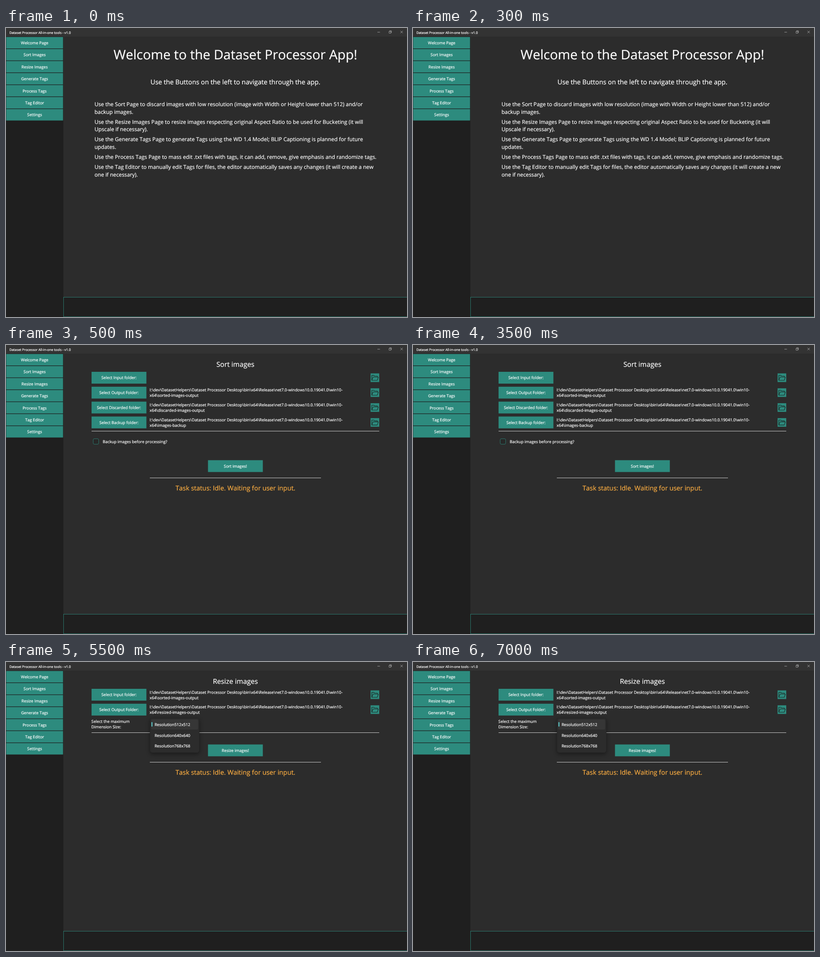
Recreate the animation shown at these times as an HTML page. Size 881 by 636 pixels, loop 8000 ms.

```html
<!DOCTYPE html>
<html lang="en">
<head>
<meta charset="utf-8">
<title>Dataset Processor</title>
<style>
  html, body { margin: 0; width: 100%; height: 100%; overflow: hidden; background: #2c2c2c; }
  svg { display: block; width: 881px; height: 636px; }
  text {
    font-family: "Open Sans", "Noto Sans", sans-serif;
    font-size: 8.82px;
    font-kerning: none;
    fill: #fff;
    stroke: #fff;
    stroke-width: .22px;
    white-space: pre;
    text-rendering: geometricPrecision;
  }
  .mid { text-anchor: middle; }
  .caption { font-size: 7.32px; }
  .title { font-size: 29.07px; }
  .lead { font-size: 14.33px; }
  .body { font-size: 11.78px; }
  .heading { font-size: 15.2px; }
  .status { font-size: 14.33px; fill: #f9ac42; stroke: #f9ac42; }
  .teal { fill: #2d8b7e; }
  .rule { fill: #c8c8c8; shape-rendering: crispEdges; }
  .thin { fill: none; stroke: #c8c8c8; stroke-width: .7; }
  .outline { stroke: #2d8b7e; stroke-width: .8; }
  .folder { fill: none; stroke: #1d2b29; stroke-width: 1.1; stroke-linejoin: round; }
  .popup { fill: #2c2c2c; stroke: #262626; stroke-width: .7; filter: drop-shadow(0 3px 4px rgba(0, 0, 0, .4)); }
</style>
</head>
<body>
<svg id="stage" viewBox="0 0 881 636"></svg>
<script>
const LOOP = 8000;
const CENTER = 504;

const rect = (x, y, w, h, cls, extra = '') =>
  `<rect x="${x}" y="${y}" width="${w}" height="${h}" class="${cls}" ${extra}/>`;
const text = (x, y, str, cls = '') => `<text x="${x}" y="${y}" class="${cls}">${str}</text>`;
const lines = (x, y, step, rows, cls) => rows.map((row, i) => text(x, y + i * step, row, cls)).join('');

// Filled button with its label centred on (cx, cy).
const button = (cx, cy, w, h, label) =>
  rect(cx - w / 2, cy - h / 2, w, h, 'teal') + text(cx, cy + 3.4, label, 'mid');

const folderIcon = cy => `<g transform="translate(801 ${cy - 9.5})">
  ${rect(0, 0, 19, 19, 'teal')}
  <path class="folder" d="M2.6 15.2V4.4H7.2L8.8 6H15V8.2M2.6 15.2L5.4 8.2H17L14.6 15.2Z"/></g>`;

const ROOT = 'I:\\dev\\DatasetHelpers\\Dataset Processor Desktop\\bin\\x64\\Release\\net7.0-windows10.0.19041.0\\win10-';

function folderRow(index, label, folder) {
  const cy = 72 + index * 32.8;
  const path = folder ? lines(315.6, cy - 2.5, 12, [ROOT, 'x64\\' + folder]) : '';
  return button(248.2, cy, 120.5, 26, label) + path + folderIcon(cy);
}

// Action button, short rule and status line.
const task = (cy, label) =>
  button(CENTER, cy, 120.5, 26, label) +
  rect(316, cy + 25.5, 376, 1, 'rule') +
  text(CENTER, cy + 53.2, 'Task status: Idle. Waiting for user input.', 'mid status');

function frame() {
  const menu = ['Welcome Page', 'Sort Images', 'Resize Images', 'Generate Tags',
    'Process Tags', 'Tag Editor', 'Settings'];
  return rect(0, 0, 881, 636, '', 'fill="#2c2c2c"') +
    rect(0, 19, 126, 617, '', 'fill="#1f1f1f"') +
    rect(0, 0, 881, 19, '', 'fill="#333"') +
    text(7.4, 12.7, 'Dataset Processor All-in-one tools - v1.0', 'caption') +
    `<path class="thin" d="M816 9.2h5.6M866.6 6.2l5.2 5.2M871.8 6.2l-5.2 5.2"/>
     <path class="thin" d="M841.6 7.4h4v4h-4zM842.8 7.2v-1.1h4v4h-1"/>` +
    menu.map((label, i) => button(62.9, 32.4 + i * 26.43, 124.8, 25.2, label)).join('') +
    rect(126.4, 592.6, 760, 42.9, 'outline', 'fill="#1f1f1f"');
}

function welcomePage() {
  const paragraphs = [
    ['Use the Sort Page to discard images with low resolution (image with Width or Height lower than 512) and/or',
      'backup images.'],
    ['Use the Resize Images Page to resize images respecting original Aspect Ratio to be used for Bucketing (it will',
      'Upscale if necessary).'],
    ['Use the Generate Tags Page to generate Tags using the WD 1.4 Model; BLIP Captioning is planned for future',
      'updates.'],
    ['Use the Process Tags Page to mass edit .txt files with tags, it can add, remove, give emphasis and randomize tags.'],
    ['Use the Tag Editor to manually edit Tags for files, the editor automatically saves any changes (it will create a new',
      'one if necessary).']
  ];
  let y = 172.3;
  const body = paragraphs.map(rows => {
    const block = lines(194.4, y, 16.3, rows, 'body');
    y += rows.length * 16.3 + 5.95;
    return block;
  }).join('');
  return text(CENTER, 69, 'Welcome to the Dataset Processor App!', 'mid title') +
    text(CENTER, 123.9, 'Use the Buttons on the left to navigate through the app.', 'mid lead') + body;
}

function sortPage() {
  return text(CENTER, 48, 'Sort images', 'mid heading') +
    folderRow(0, 'Select Input folder:') +
    folderRow(1, 'Select Output Folder:', 'sorted-images-output') +
    folderRow(2, 'Select Discarded folder:', 'discarded-images-output') +
    folderRow(3, 'Select Backup folder:', 'images-backup') +
    rect(188, 189, 632, 1, 'rule') +
    rect(191.6, 206.3, 12, 12, 'outline', 'rx="2.5" fill="#272727"') +
    text(212.6, 215.9, 'Backup images before processing?') +
    task(266.5, 'Sort images!');
}

function resizePage() {
  const sizes = ['Resolution512x512', 'Resolution640x640', 'Resolution768x768'];
  return text(CENTER, 48, 'Resize images', 'mid heading') +
    folderRow(0, 'Select Input folder:', 'sorted-images-output') +
    folderRow(1, 'Select Output Folder:', 'resized-images-output') +
    lines(187.6, 134.3, 12, ['Select the maximum', 'Dimension Size:']) +
    rect(188, 155, 632, 1, 'rule') +
    task(194.5, 'Resize images!') +
    rect(316.5, 123.4, 108, 76, 'popup', 'rx="4.5"') +
    rect(319, 126.4, 103, 22, '', 'rx="2.5" fill="#363636"') +
    rect(319.6, 132.2, 2, 10, '', 'rx="1" fill="#5fd6d6"') +
    lines(326.4, 140.6, 23.9, sizes);
}

const pages = [
  { draw: welcomePage, from: 0, to: 500 },
  { draw: sortPage, from: 500, to: 5500 },
  { draw: resizePage, from: 5500, to: LOOP }
];

const stage = document.getElementById('stage');
stage.innerHTML = frame() + pages.map(page => `<g class="page">${page.draw()}</g>`).join('');

const groups = stage.querySelectorAll('.page');
function show(now) {
  const t = now % LOOP;
  pages.forEach(({ from, to }, i) => {
    groups[i].style.display = t >= from && t < to ? '' : 'none';
  });
}

const start = performance.now();
function tick() {
  show(performance.now() - start);
  requestAnimationFrame(tick);
}
tick();
</script>
</body>
</html>
```
